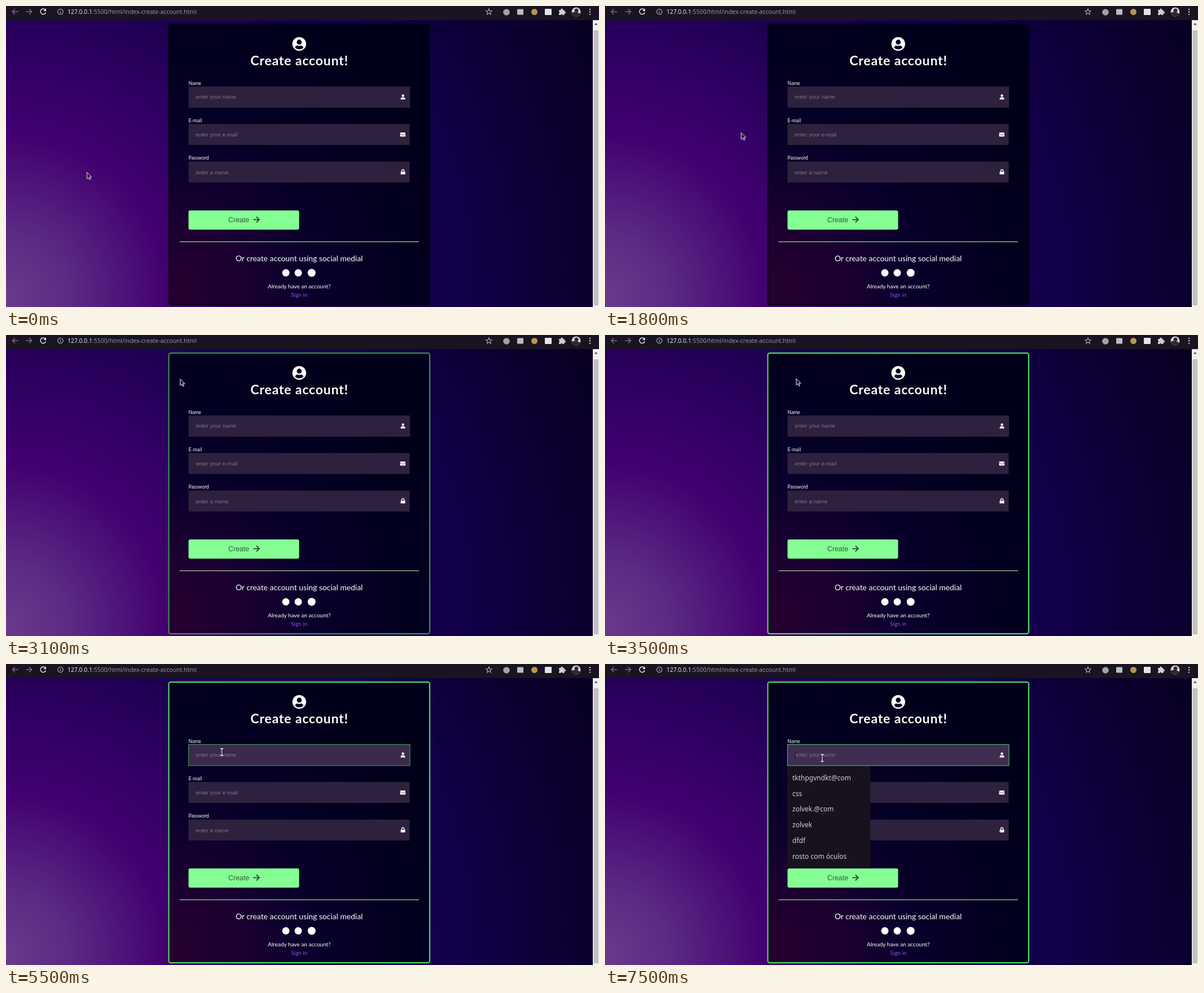
These frames come from a looping animation (1051x533 px, 8 s). An HTML page:

```html
<!DOCTYPE html>
<html lang="en">
<head>
<meta charset="utf-8">
<title>Create account</title>
<style>
  html, body { margin: 0; width: 100%; height: 100%; overflow: hidden; background: #191322; }
  svg { display: block; width: 1051px; height: 533px; }
  text { font-family: Lato, sans-serif; fill: #fff; white-space: pre; }
  .mid { text-anchor: middle; }
  .ui { font-family: "Noto Sans", sans-serif; }
  .title { font-size: 23.13px; font-weight: 700; letter-spacing: .77px; fill: #fffaf5; }
  .label { font-size: 8.63px; }
  .hint { font: 9.87px "Liberation Sans", Arial, sans-serif; fill: #7c7484; }
  .small { font-size: 10.02px; }
  .list text { font-size: 12px; font-weight: 500; fill: #d3d0d8; }
  .field { fill: #2e213e; }
  .line { fill: none; stroke-width: 1.4; }

  .card, .name, .arrow, .beam, .tip, .list { animation: 8s linear -10ms infinite; }
  .card { stroke: #04001a; stroke-width: 2; animation-name: glow; }
  .name { animation-name: hover; }
  .arrow { animation-name: point; }
  .beam { animation-name: beam; }
  .tip { animation-name: tip; }
  .list { animation-name: list; }

  @keyframes glow {
    0%, 33.75% { stroke: #04001a; animation-timing-function: steps(6); }
    41.25%, 100% { stroke: #50e667; }
  }
  @keyframes hover {
    0%, 65% { fill: #2e213e; stroke: #50e66700; animation-timing-function: steps(3); }
    68.75% { fill: #3c2a4d; stroke: #50d866b8; animation-timing-function: steps(5); }
    75%, 100% { fill: #402d52; stroke: #50e667e0; }
  }
  @keyframes point {
    0%, 13.75% { transform: translate(143.5px, 294.5px); animation-timing-function: steps(7); }
    22.5% { transform: translate(241.5px, 224.5px); animation-timing-function: steps(2); }
    25% { transform: translate(245px, 220.5px); animation-timing-function: steps(5); }
    31.25% { transform: translate(278px, 140px); animation-timing-function: steps(2); }
    33.75% { transform: translate(292px, 108px); animation-timing-function: steps(3); }
    37.5% { transform: translate(307.5px, 80px); animation-timing-function: steps(1); }
    38.75% { transform: translate(308.8px, 78px); animation-timing-function: steps(7); }
    47.5%, 50% { transform: translate(361.5px, 76.5px); animation-timing-function: steps(3); }
    53.75%, 56.25% { transform: translate(373.5px, 94.5px); animation-timing-function: steps(1); }
    57.5% { transform: translate(380.5px, 116.5px); animation-timing-function: steps(1); }
    58.75%, 60% { transform: translate(383px, 124.5px); visibility: visible; animation-timing-function: steps(4); }
    65%, 100% { transform: translate(382px, 143px); visibility: hidden; }
  }
  @keyframes beam {
    0% { visibility: hidden; transform: translate(382px, 145px); animation-timing-function: step-end; }
    65% { visibility: visible; transform: translate(382px, 145px); animation-timing-function: steps(3); }
    68.75% { visibility: visible; transform: translate(382.5px, 156px); animation-timing-function: steps(2); }
    71.25%, 100% { visibility: visible; transform: translate(385px, 166.5px); }
  }
  @keyframes tip {
    0%, 93.75%, 100% { visibility: hidden; animation-timing-function: step-end; }
    83.75% { visibility: visible; animation-timing-function: step-end; }
  }
  @keyframes list {
    0% { visibility: hidden; animation-timing-function: step-end; }
    93.75%, 100% { visibility: visible; }
  }
</style>
</head>
<body>
<svg viewBox="0 0 1051 533">
  <defs>
    <radialGradient id="page" gradientUnits="userSpaceOnUse" cx="0" cy="515" r="1150">
      <stop offset="0" stop-color="#6a3a8b"/>
      <stop offset=".1" stop-color="#5b2a84"/>
      <stop offset=".25" stop-color="#43006f"/>
      <stop offset=".34" stop-color="#330066"/>
      <stop offset=".48" stop-color="#1d0052"/>
      <stop offset=".7" stop-color="#12004a"/>
      <stop offset=".8" stop-color="#0d003a"/>
      <stop offset="1" stop-color="#080022"/>
    </radialGradient>
    <radialGradient id="panel" gradientUnits="userSpaceOnUse" cx="300" cy="500" r="500">
      <stop offset="0" stop-color="#250030"/>
      <stop offset=".25" stop-color="#1a0030"/>
      <stop offset=".5" stop-color="#08002a"/>
      <stop offset=".8" stop-color="#030020"/>
      <stop offset="1" stop-color="#01001a"/>
    </radialGradient>
    <clipPath id="round"><circle cx="1010.500" cy="10.500" r="8"/></clipPath>
  </defs>

  <!-- page -->
  <rect y="25" width="1040" height="508" fill="url(#page)"/>

  <!-- browser bar -->
  <rect width="1051" height="25" fill="#191322"/>
  <g class="line" stroke="#77727d">
    <path d="M21.500 10H11.500M16 5.300L11.300 10L16 14.700"/>
    <path d="M35.500 10H45.500M41 5.300L45.700 10L41 14.700"/>
  </g>
  <path class="line" stroke="#eee" d="M69.600 6.700A4.800 4.800 0 1 0 70.500 11.300"/>
  <path fill="#eee" d="M71 4.300V9H66.300Z"/>
  <g class="line" stroke="#b9b6bd" style="stroke-width:1.100">
    <circle cx="96.500" cy="10" r="4.700"/>
    <path d="M96.500 9.500V12.800M96.500 7.300V8.500"/>
    <path d="M856 5L857.400 8.500L861.200 8.800L858.300 11.200L859.200 14.900L856 12.900L852.800 14.900L853.700 11.200L850.800 8.800L854.600 8.500Z"/>
  </g>
  <text class="ui" x="109" y="13.800" font-size="10.400" style="fill:#e6e4e8">127.0.0.1<tspan fill="#98949e">:5500/html/index-create-account.html</tspan></text>
  <circle cx="887" cy="11" r="5.800" fill="#a3a29f"/>
  <rect x="906" y="5.500" width="11" height="10" rx="1" fill="#bdbcbe"/>
  <circle cx="936.500" cy="10.500" r="5.500" fill="#b7964f"/>
  <rect x="955" y="5" width="12" height="11" rx="1" fill="#e4e3e6"/>
  <path fill="#cfcdd2" d="M980 7H983.300A1.900 1.900 0 1 1 986.900 7H989.500V9.600A1.900 1.900 0 1 1 989.500 13.200V16H986.500A1.700 1.700 0 0 0 983.200 16H980V12.800A1.700 1.700 0 0 0 980 9.700Z"/>
  <g clip-path="url(#round)">
    <rect x="1002" y="2" width="17" height="17" fill="#d9d4d6"/>
    <path d="M1002 19V12Q1009 8 1019 14V19Z" fill="#33262e"/>
    <circle cx="1011" cy="8" r="3.500" fill="#33262e"/>
  </g>
  <g fill="#d4d2d7">
    <circle cx="1035" cy="6" r="1.200"/><circle cx="1035" cy="10.300" r="1.200"/><circle cx="1035" cy="14.600" r="1.200"/>
  </g>

  <!-- scrollbar -->
  <rect x="1040" y="25" width="11" height="508" fill="#f1f1f1"/>
  <rect x="1041.500" y="43" width="8.500" height="487" fill="#c1c1c1"/>
  <path d="M1042.800 33.500L1045.800 30L1048.800 33.500Z" fill="#505050"/>

  <!-- card -->
  <rect class="card" x="288.500" y="32" width="462.500" height="497" rx="3.500" fill="url(#panel)"/>
  <circle cx="519.700" cy="67.200" r="12.200" fill="#fff"/>
  <g fill="#05001f">
    <circle cx="519.700" cy="64" r="4.400"/>
    <path d="M512.300 73.500Q513.500 70 516.500 70Q519.700 71.300 522.900 70Q526 70 527.100 73.500Q524.300 76.800 519.700 76.800Q515.100 76.800 512.300 73.500Z"/>
  </g>
  <text class="title mid" x="520" y="105.400">Create account!</text>

  <!-- fields -->
  <text class="label" x="323.500" y="139.500">Name</text>
  <text class="label" x="323.500" y="206">E-mail</text>
  <text class="label" x="323.500" y="272.300">Password</text>
  <rect class="field name" x="323.500" y="142.500" width="392.500" height="37.500" stroke-width="1"/>
  <rect class="field" x="323.500" y="209" width="392" height="37"/>
  <rect class="field" x="323.500" y="275.500" width="392" height="37"/>
  <text class="hint" x="336.300" y="164.300">enter your name</text>
  <text class="hint" x="336.300" y="231.300">enter your e-mail</text>
  <text class="hint" x="336.300" y="297.500">enter a name</text>
  <g fill="#fff">
    <circle cx="703.500" cy="158.800" r="2.300"/>
    <path d="M699.500 165.500V164Q699.700 161.700 702 161.700H705Q707.300 161.700 707.500 164V165.500Z"/>
    <rect x="698.500" y="224" width="9.500" height="7.200" rx="1"/>
    <path d="M699.500 293.500H707.500V298.200H699.500Z"/>
  </g>
  <path class="line" stroke="#2e213e" style="stroke-width:.8" d="M698.500 225.700L703.200 229L708 225.700"/>
  <path class="line" stroke="#fff" d="M701.400 293.800V291.800A2.100 2.100 0 0 1 705.600 291.800V293.800"/>

  <!-- button -->
  <rect x="323.500" y="362" width="196" height="34" rx="3" fill="#85ff94"/>
  <text x="394" y="382.600" style="font:12.330px 'Liberation Sans',Arial,sans-serif;fill:#2f5a38">Create</text>
  <path class="line" stroke="#24492c" style="stroke-width:1.800" d="M438.300 378.300H448.700M443.800 373.200L448.900 378.300L443.800 383.400"/>

  <!-- footer -->
  <rect x="307.500" y="417" width="424.500" height="1" fill="#d3e8b8"/>
  <text class="mid" x="519.600" y="451.800" font-size="13.880">Or create account using social medial</text>
  <g fill="#fff">
    <circle cx="496" cy="472.500" r="6.500"/><circle cx="518" cy="472.500" r="6.500"/><circle cx="541.700" cy="472.500" r="7"/>
  </g>
  <text class="small mid" x="519.700" y="499.700">Already have an account?</text>
  <text class="small mid" x="519.700" y="515" style="fill:#8b4fe2">Sign in</text>

  <!-- tooltip -->
  <g class="tip">
    <rect x="393.500" y="178.500" width="126" height="19.500" fill="#0e0d12" stroke="#f0f0e6"/>
    <text class="ui" x="399" y="192.300" font-size="11">Preencha este campo.</text>
  </g>

  <!-- suggestions -->
  <g class="list">
    <rect x="323" y="181" width="147.500" height="179.500" fill="#18121f"/>
    <rect x="336.500" y="154.500" width="1" height="13" fill="#0c0814"/>
    <text class="ui" x="332" y="205.700">tkthpgvndkt@com</text>
    <text class="ui" x="332" y="233.500">css</text>
    <text class="ui" x="332" y="261.200">zolvek.@com</text>
    <text class="ui" x="332" y="289">zolvek</text>
    <text class="ui" x="332" y="316.700">dfdf</text>
    <text class="ui" x="332" y="344.500">rosto com óculos</text>
  </g>

  <!-- pointers -->
  <path class="arrow" d="M0 0V11.500L2.700 9L4.600 13L6.500 12.200L4.700 8.300H8Z" fill="#15101c" stroke="#fff"/>
  <g class="beam line">
    <path stroke="#120c1a" style="stroke-width:3" d="M0 -5.500V5.500"/>
    <path stroke="#fff" style="stroke-width:1.300" d="M-2.500 -6H2.500M0 -6V6M-2.500 6H2.500"/>
  </g>
</svg>
</body>
</html>
```
